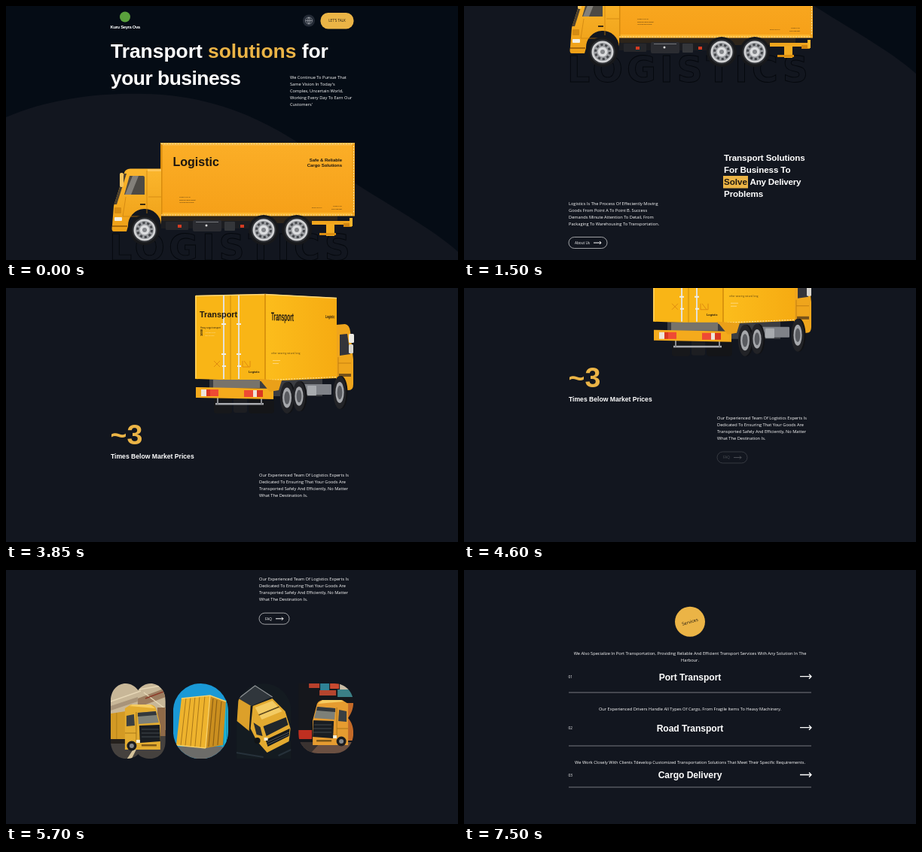
An HTML page for the animation above (8000 ms loop, 600 by 338 pixels).

```html
<!DOCTYPE html>
<html lang="en">
<head>
<meta charset="utf-8">
<title>Transport solutions</title>
<style>
html, body { margin: 0; width: 100%; height: 100%; overflow: hidden; background: #12161f; }
svg { display: block; width: 100%; height: 100%; }
text { font-family: "Open Sans", "Noto Sans", sans-serif; fill: #fff; white-space: pre; }
.h { font-family: "Liberation Sans", Arial, sans-serif; font-weight: 700; }
.outline { font-family: "DejaVu Sans", sans-serif; font-weight: 700; fill: none; stroke: #05080d; stroke-width: .9; }
.dark { fill: #1d1710; }
.gold { fill: #ebb446; }
.mid { text-anchor: middle; }
.end { text-anchor: end; }
.line { fill: none; stroke: #fff; }
</style>
</head>
<body>
<svg id="stage" viewBox="0 0 600 338" xmlns="http://www.w3.org/2000/svg"></svg>
<script>
const LOOP = 8000, STEP = 50;
// start time and distance of each scroll
const SCROLLS = [[450, 237], [2400, 338], [4350, 237], [6400, 339]];
const SCROLL_MS = 600;

const text = (x, y, size, s, cls = '', extra = '') =>
  `<text x="${x}" y="${y}" font-size="${size}" class="${cls}" ${extra}>${s}</text>`;
const para = (x, y, lines, cls = '') =>
  lines.map((s, i) => text(x, y + i * 9.05, 5.68, s, cls)).join('');
const rect = (x, y, w, h, fill, rx = 0) =>
  `<rect x="${x}" y="${y}" width="${w}" height="${h}" rx="${rx}" fill="${fill}"/>`;
const poly = (points, fill) => `<polygon points="${points}" fill="${fill}"/>`;
const oval = (x, y, rx, ry, fill) => `<ellipse cx="${x}" cy="${y}" rx="${rx}" ry="${ry}" fill="${fill}"/>`;
const disc = (x, y, r, fill) => oval(x, y, r, r, fill);
const path = (d, fill) => `<path d="${d}" fill="${fill}"/>`;
const stroke = (d, color, w, extra = '') =>
  `<path d="${d}" fill="none" stroke="${color}" stroke-width="${w}" ${extra}/>`;
const group = (id, body, y = 0) => `<g id="${id}" transform="translate(0 ${y})">${body}</g>`;
const arrow = (x, y, len, w) => {
  const h = len * 0.2;
  return stroke(`M${x} ${y}h${len}m${-h} ${-h}l${h} ${h}l${-h} ${h}`, '#fff', w);
};
const pill = (x, y, w, label) =>
  `<rect class="line" x="${x}" y="${y}" width="${w}" height="15" rx="7.5" stroke-width=".6"/>` +
  text(x + 8, y + 9.4, 4.7, label) + arrow(x + w - 18, y + 7.6, 10, 1);

const wheel = (x, y) =>
  disc(x, y, 20, '#17181b') + disc(x, y, 16.5, '#303236') + disc(x, y, 14.5, '#d3d4d6') +
  disc(x, y, 12, '#9b9da1') +
  `<circle cx="${x}" cy="${y}" r="9.5" fill="none" stroke="#45474b" stroke-width="3" stroke-dasharray="3.2 2.77"/>` +
  disc(x, y, 6.5, '#dcdddf') + disc(x, y, 3, '#85878b');

const rivets = d => stroke(d, '#ffe0a0', 1.1, 'stroke-dasharray="2 1.6"');

function sideTruck() {
  const chassis =
    rect(204, 279, 236, 10, '#2d241a') + rect(206, 286, 118, 10, '#1c1d21') +
    rect(248, 285, 38, 15, '#2b2c31', 2) + rect(290, 287, 14, 12, '#34363a', 1) +
    rect(212, 287, 30, 11, '#26272b', 1) + rect(228, 291, 5, 4, '#d43b22') +
    rect(311, 291, 5, 4, '#d43b22') + disc(266, 292, 1.5, '#d8d8d8') + rect(252, 287, 30, 1, '#74767b') +
    rect(406, 286, 50, 5, '#f0a51d') + rect(425, 290, 11, 16, '#f3ab22') +
    rect(416, 302, 22, 3, '#d98d12') + rect(448, 289, 11, 5, '#cf8511') + rect(456, 282, 4, 11, '#f9b62c');
  const box =
    rect(206, 183, 256, 96, 'url(#panel)') + rect(205, 182, 258, 4, '#fbb83d') +
    rect(205, 275, 258, 4.5, '#fdb62f') + rect(459, 183, 4, 96, '#f2a31c') + rect(205, 183, 2.5, 96, '#d88c0e') +
    rivets('M206 183.5H462') + rivets('M206 278H462') + rivets('M461.5 186V276') +
    text(221.5, 213, 16, 'Logistic', 'h dark') +
    text(446, 207, 6, 'Safe &amp; Reliable', 'h dark end') +
    text(446, 214.4, 6, 'Cargo Solutions', 'h dark end') +
    text(230, 255, 2, 'CARGO UNIT 40', 'dark') + text(230, 259, 2, 'Maximum gross weight', 'dark') +
    text(230, 261.6, 2, 'Net load and volume', 'dark') +
    text(406, 269, 2, 'ROAD UNIT 12', 'dark') + text(434, 267, 2, 'CARGO LINE', 'dark') +
    text(432, 271, 2, 'Door side right', 'dark');
  const cab =
    path('M157 222Q158 217 165 216.5H206V291A22 22 0 0 0 162 293L160 300H143Q139.5 300 141 292L143 266Z', 'url(#cab)') +
    poly('157,223 160,223 147,264 143.5,264', '#4b4030') +
    path('M164 226H182Q184 226 184 228V251H157Z', '#4d4a45') + poly('168,226 176,226 166,251 158,251', '#83807a') +
    rect(151, 222, 5, 19, '#f7c45c', 2) + stroke('M187 219V276M159 254L155 280H186M189 254H206', '#c97f0d', 0.7) +
    rect(178, 263, 7, 2, '#3c2a10') + rect(188, 217, 18, 3, '#ffc658') +
    rect(144, 281, 10, 5, '#f3efe2', 1) + rect(141, 292, 20, 2, '#a8690b') + rect(144, 268, 9, 8, '#d48b13', 1);
  return chassis + box + cab + [184, 342, 386].map(x => wheel(x, 298)).join('');
}

function rearTruck() {
  const under =
    rect(276, 144, 24, 23, '#17181b', 3) + rect(302, 144, 18, 22, '#1d1e22', 3) + rect(322, 146, 34, 21, '#141518', 4) +
    rect(270, 120, 150, 24, '#3b3d42') + rect(278, 153, 64, 2.5, '#a9abb0') + rect(280, 146, 2, 9, '#8a8c90') +
    rect(338, 146, 2, 9, '#8a8c90') + rect(396, 128, 36, 14, '#7f8288', 1) + rect(400, 130, 12, 13, '#a7aaae', 1);
  const cab =
    path('M438 49L450 48Q456 49 457 58L461 95V128Q461 136 455 136H438Z', '#efa51c') +
    poly('443,62 453,61 457,88 443,90', '#34343a') + rect(455, 61, 7, 12, '#eceae4', 1.5) +
    rect(455, 75, 6, 12, '#d8d5cd', 1.5) + stroke('M441 92V126M441 100H458', '#b9780f', 0.8) +
    rect(442, 114, 16, 4, '#77521a');
  const tyres = [[373, 146, 9, 21], [389, 144, 8.5, 20], [443, 139, 8.5, 22]].map(([x, y, rx, ry]) =>
    oval(x + 2, y, rx, ry, '#111215') + oval(x, y, rx, ry, '#222327') + oval(x, y, rx * 0.66, ry * 0.64, '#a6a8ac') +
    oval(x, y, rx * 0.4, ry * 0.42, '#595b60')).join('');
  const box =
    poly('344,8 439,13 439,120 344,124', 'url(#side)') + poly('251,10 344,8 344,124 251,121', '#f9b516') +
    stroke('M252 10.5L344 8.5L439 13.5', '#ffd778', 1.4) + rivets('M346 122.5L438 118.5') +
    stroke('M344 8V124', '#d28c0b', 1.6) + stroke('M298 10V122', '#c58508', 0.8) +
    stroke('M252 11V120', '#ffcb4e', 2) + stroke('M289 10V121M309 10V121', '#e4e1d8', 2) +
    stroke('M286 48h6M286 88h6M306 48h6M306 88h6M287 104h5M307 104h5', '#f1eee5', 2) +
    text(257, 39, 10.9, 'Transport', 'h dark') + text(258, 54, 2.6, 'Heavy cargo transport', 'dark') +
    text(260.5, 64, 4, '1000', 'h dark', 'transform="rotate(-90 260.5 64)"') +
    text(264, 60, 2.2, 'Net load units', '', 'opacity=".7"') + text(264, 63.5, 2.2, 'Max volume', '', 'opacity=".7"') +
    stroke('M276 97l8 8m0-8l-8 8M314 97v8h10v-8m-8 0l6 8', '#d8810f', 0.8) +
    text(322, 113, 3.8, 'Logistic', 'h dark') +
    // lettering foreshortened with the side wall
    `<g transform="translate(352 43) skewY(2) scale(.42 1)">${text(0, 0, 15.5, 'Transport', 'h dark')}</g>` +
    `<g transform="translate(424 40) skewY(2) scale(.55 1)">${text(0, 0, 5.8, 'Logistic', 'h dark')}</g>` +
    text(352, 88, 3.1, 'other wearing natural long', 'dark', 'opacity=".7"') +
    rect(354, 96, 10, 0.8, '#ffdd90') + rect(354, 100, 8, 0.8, '#ffdd90');
  const bumper =
    rect(275, 122, 62, 11, '#77736b') + poly('252,132 355,134 355,148 252,146', '#f4aa1c') +
    poly('336,121 366,123 362,136 350,138', '#eaa019') + rect(259, 135, 7, 9, '#efe5da') +
    rect(266, 135, 5, 9, '#da3722') + rect(271, 135, 11, 9, '#ef4a34') +
    rect(316, 136, 12, 9, '#ef4a34') + rect(328, 136, 5, 9, '#efe5da') + rect(333, 136, 8, 9, '#da3722');
  return under + cab + tyres + box + bumper;
}

const SHAPES = [
  'M0 24C0 9 9 0 20 0C27 0 33 4 36.5 9C40 4 46 0 53 0C64 0 73 9 73 24V76C73 91 64 100 53 100' +
    'C46 100 40 98 36.5 94C33 98 27 100 20 100C9 100 0 91 0 76Z',
  'M0 36.5A36.5 36.5 0 0 1 73 36.5V64A36.5 36.5 0 0 1 0 64Z',
  'M0 36.5A36.5 36.5 0 0 1 73 36.5V100H0Z',
  'M0 0H48C62 0 73 11 73 25C73 34 70 40 66 46C71 52 73 58 73 66C73 82 62 93 48 93H26A26 26 0 0 1 0 67Z'
];
const PHOTO_X = [139, 222, 305.5, 388];
const SPREAD = [-1, -0.72, 0.72, 1.02];

const frontCab = (x, y, body, flip = 1) => `<g transform="translate(${x} ${y}) scale(${flip} 1)">` +
  path('M0 5L8 0H34Q41 1 42 8L47 27V60H0Z', body) + path('M6 2L10 0H34L40 5Z', '#f6cd62') +
  poly('17,11 41,9 45,24 18,26', '#7d8078') + poly('17,11 41,9 42,14 17,16', '#33383c') +
  poly('2,15 12,13 13,28 2,29', '#3a3f42') + poly('19,28 46,27 47,49 20,51', '#191d22') +
  stroke('M22 33H45M22 38H46M22 43H46', '#4d535a', 0.8) + stroke('M15 10V50M0 38H15', '#9b6c14', 0.8) +
  rect(15, 47, 5, 4, '#f5efd8') + rect(22, 53, 20, 2.5, '#7c5718') +
  disc(9, 55, 6.5, '#1a1c20') + disc(9, 55, 3, '#85888b') + '</g>';

const PHOTOS = [
  rect(0, 0, 73, 62, '#c8b798') + poly('36,20 73,6 73,18 36,32', '#9c7d60') + poly('0,30 36,18 36,24 0,36', '#a8947a') +
    stroke('M0 24L40 10M44 12L73 34M38 8L73 2', '#e6d7b6', 1.5) + stroke('M46 20L70 11', '#8c3c2a', 1.5) +
    rect(62, 32, 11, 38, '#8f6a48') + rect(0, 70, 73, 30, '#45413e') + poly('22,100 31,86 35,86 28,100', '#d5c39a') +
    poly('0,40 20,37 20,76 0,74', '#d39a24') + rect(0, 74, 20, 6, '#25211d') + stroke('M8 39V74', '#a97617', 0.8) +
    frontCab(19, 28, '#e3ac30'),
  rect(0, 0, 73, 100, '#1a99d6') + rect(64, 22, 9, 64, '#1fb4d4') + stroke('M67 24V84M71 24V84', '#1280ab', 1) +
    rect(0, 84, 73, 16, '#6c6c69') +
    poly('11,20 49,16 43,86 4,82', '#eeb32d') + poly('49,16 70,24 66,82 43,86', '#cb8f1f') +
    stroke('M17 20L10 83M23 19L16 83M29 18L23 84M35 18L29 84M42 17L36 85', '#aa7719', 1) +
    stroke('M53 20L47 84M58 22L53 83M64 24L59 82', '#8d6014', 1.2) +
    stroke('M11 20L49 16L70 24M4 82L43 86M49 16L43 86', '#f9d16a', 1.4),
  rect(0, 0, 73, 100, '#141b21') + stroke('M0 92L36 98M56 96L73 88', '#26313a', 2) +
    poly('3,20 25,4 47,18 20,30', '#30363c') + stroke('M3 20L25 3L48 18', '#8d9194', 1.4) +
    poly('3,20 20,30 18,64 1,50', '#dca02a') + stroke('M20 30L18 64', '#171a1d', 2) +
    poly('22,30 48,20 65,37 72,60 70,77 41,92 27,76 19,60', '#e3aa30') + poly('25,32 48,23 61,37 34,48', '#f3cb63') +
    stroke('M30 42L57 31', '#5a451b', 1.5) + poly('36,57 66,45 69,55 40,70', '#20262b') +
    poly('23,52 32,58 35,70 27,68', '#292d2f') + poly('39,75 71,60 70,70 42,84', '#14191d') +
    stroke('M41 78L70 65M42 81L70 68', '#5b6369', 0.8) + rect(37, 72, 5, 4, '#f7edd0') + disc(28, 76, 4, '#111417'),
  rect(0, 0, 73, 93, '#15171c') + rect(14, 0, 14, 6, '#b8402c') + rect(29, 0, 12, 9, '#2f8296') + rect(42, 0, 12, 7, '#c94a30') +
    rect(28, 9, 22, 7, '#b5452e') + rect(52, 8, 21, 10, '#3b7f86') + rect(55, 0, 18, 8, '#cabda6') +
    rect(0, 62, 18, 12, '#bf2f20') + rect(0, 78, 73, 15, '#6b5042') + poly('0,78 30,78 16,93 0,93', '#3a3230') +
    rect(62, 26, 11, 50, '#c46a28') + frontCab(66, 22, '#e69c30', -1)
];

const photo = i => `<clipPath id="clip${i}"><path d="${SHAPES[i]}"/></clipPath>` +
  `<g id="photo${i}"><g clip-path="url(#clip${i})">${PHOTOS[i]}</g></g>`;

const hero =
  rect(0, 0, 600, 340, '#050c15') +
  path('M0 148C60 122 130 115 185 117C320 120 400 190 465 237C520 272 570 300 600 327V342H0Z', '#12161f') +
  disc(158, 14.5, 7, '#5aa03c') + text(138.5, 29.6, 5.9, 'Kuru Seyra Ova', 'h', 'letter-spacing="-.35"') +
  disc(402, 19.5, 8, '#232a35') +
  stroke('M397.5 19.5a4.5 4.5 0 1 0 9 0a4.5 4.5 0 1 0-9 0h9M402 15v9M402 15q-4 4.5 0 9q4-4.5 0-9', '#c9ccd1', 0.5) +
  rect(417.5, 9, 44, 21.5, '#ebb446', 10) + text(439.5, 21.4, 4.6, "LET'S TALK", 'dark mid') +
  text(139, 69, 26.4, 'Transport <tspan class="gold">solutions</tspan> for', 'h') +
  text(139, 105, 26.4, 'your business', 'h', 'letter-spacing="-.5"') +
  para(377, 97.2, ['We Continue To Pursue That', "Same Vision In Today's", 'Complex, Uncertain World,',
    'Working Every Day To Earn Our', "Customers'"]) +
  text(137, 337.5, 47.5, 'LOGISTICS', 'outline', 'letter-spacing="5"') +
  sideTruck();

const solve = cls => text(345, 237.8, 11.6, 'Solve', 'h ' + cls);
const about =
  ['Transport Solutions', 'For Business To', '', 'Problems'].map((s, i) =>
    text(345, 205.5 + i * 16.3, 11.6, s, 'h', 'letter-spacing="-.1"')).join('') +
  text(379.5, 237.8, 11.6, 'Any Delivery', 'h', 'letter-spacing="-.2"') + solve('') +
  '<clipPath id="wipe"><rect id="wipeRect" x="344" y="225" width="33" height="19"/></clipPath>' +
  `<g clip-path="url(#wipe)">${rect(344, 226, 33, 16.5, '#ebb446')}${solve('dark')}</g>` +
  para(139, 265, ['Logistics Is The Process Of Effeciently Moving', 'Goods From Point A To Point B. Success',
    'Demands Minute Attention To Detail, From', 'Packaging To Warehousing To Transportation.']) +
  pill(139, 307.5, 51, 'About Us');

const prices =
  text(138.5, 208, 37.5, '~1', 'h gold', 'id="count"') + text(139, 227, 8.6, 'Times Below Market Prices', 'h') +
  para(336, 251, ['Our Experienced Team Of Logistics Experts Is', 'Dedicated To Ensuring That Your Goods Are',
    'Transported Safely And Efficiently, No Matter', 'What The Destination Is.']);

const badge = disc(300, 68.8, 20, '#ebb446') + text(300, 71, 5.8, 'Services', 'dark mid', 'transform="rotate(-17 300 69)"');

// title, title centre, rule, first baseline of the description
const ROWS = [
  ['Port Transport', 142, 163, 112.6, ['We Also Specialize In Port Transportation, Providing Reliable And Efficient Transport Services With Any Solution In The', 'Harbour.']],
  ['Road Transport', 210, 234, 187, ['Our Experienced Drivers Handle All Types Of Cargo, From Fragile Items To Heavy Machinery.']],
  ['Cargo Delivery', 272.8, 289, 257.8, ['We Work Closely With Clients Tdevelop Customized Transportation Solutions That Meet Their Specific Requirements.']]
];
const row = ([title, y, rule, descY, lines], i) =>
  group('desc' + i, para(300, descY, lines, 'mid')) +
  group('row' + i, text(138.5, y + 1.8, 4.7, '0' + (i + 1)) +
    text(300, y + 4.6, 12.1, title, 'h mid', 'letter-spacing="-.05"') +
    arrow(446, y - 0.3, 15, 1.3) + stroke(`M139 ${rule}H461`, '#a3a5aa', 0.7));

const gradient = (id, from, to, vector) => `<linearGradient id="${id}" ${vector}>` +
  `<stop stop-color="${from}"/><stop offset="1" stop-color="${to}"/></linearGradient>`;

const stage = document.getElementById('stage');
stage.innerHTML = '<defs>' +
  gradient('panel', '#fbae27', '#f6a018', 'x2="0" y2="1"') +
  gradient('cab', '#fbb62d', '#ee9f16', 'x2="0" y2="1"') +
  gradient('side', '#fcbd1c', '#f6ab12', 'x2="1" y2="0"') + '</defs>' +
  rect(0, 0, 600, 338, '#12161f') +
  group('page', group('hero', hero) + group('about', about, 237) + group('prices', prices, 575) +
    group('rear', rearTruck(), 575) + group('faq', pill(336, 57.2, 40, 'FAQ'), 812) +
    PHOTOS.map((_, i) => photo(i)).join('') +
    group('badge', badge, 1151) + group('services', ROWS.map(row).join(''), 1151));

const $ = id => document.getElementById(id);
const ramp = (t, start, ms) => Math.min(1, Math.max(0, (t - start) / ms));
const easeInOut = p => p < 0.5 ? 0.5 * (2 * p) ** 2.42 : 1 - 0.5 * (2 - 2 * p) ** 2.42;
const fade = (id, t, start, ms) => $(id).setAttribute('opacity', ramp(t, start, ms));

function draw(t) {
  const y = SCROLLS.reduce((sum, [start, d]) => sum + d * easeInOut(ramp(t, start, SCROLL_MS)), 0);
  $('page').setAttribute('transform', `translate(0 ${-y})`);

  fade('about', t, 600, 350);
  $('wipeRect').setAttribute('width', 33 * ramp(t, 1000, 500));

  fade('prices', t, 2550, 350);
  $('count').textContent = '~' + (t < 3300 ? 1 : t < 3700 ? 2 : 3);
  fade('rear', t, 3050, 800);
  fade('faq', t, 4500, 400);

  const gap = 77 * (1 - ramp(t, 4950, 850)) ** 3;
  PHOTO_X.forEach((x, i) => {
    $('photo' + i).setAttribute('transform', `translate(${x + SPREAD[i] * gap} 963)`);
    fade('photo' + i, t, 4900, 250);
  });

  fade('badge', t, 6450, 300);
  ROWS.forEach((_, i) => {
    fade('desc' + i, t, 6500 + 150 * i, 400);
    fade('row' + i, t, 7000, 500);
  });
}

function tick() {
  draw(Math.floor(performance.now() % LOOP / STEP) * STEP);
  requestAnimationFrame(tick);
}
tick();
</script>
</body>
</html>
```
